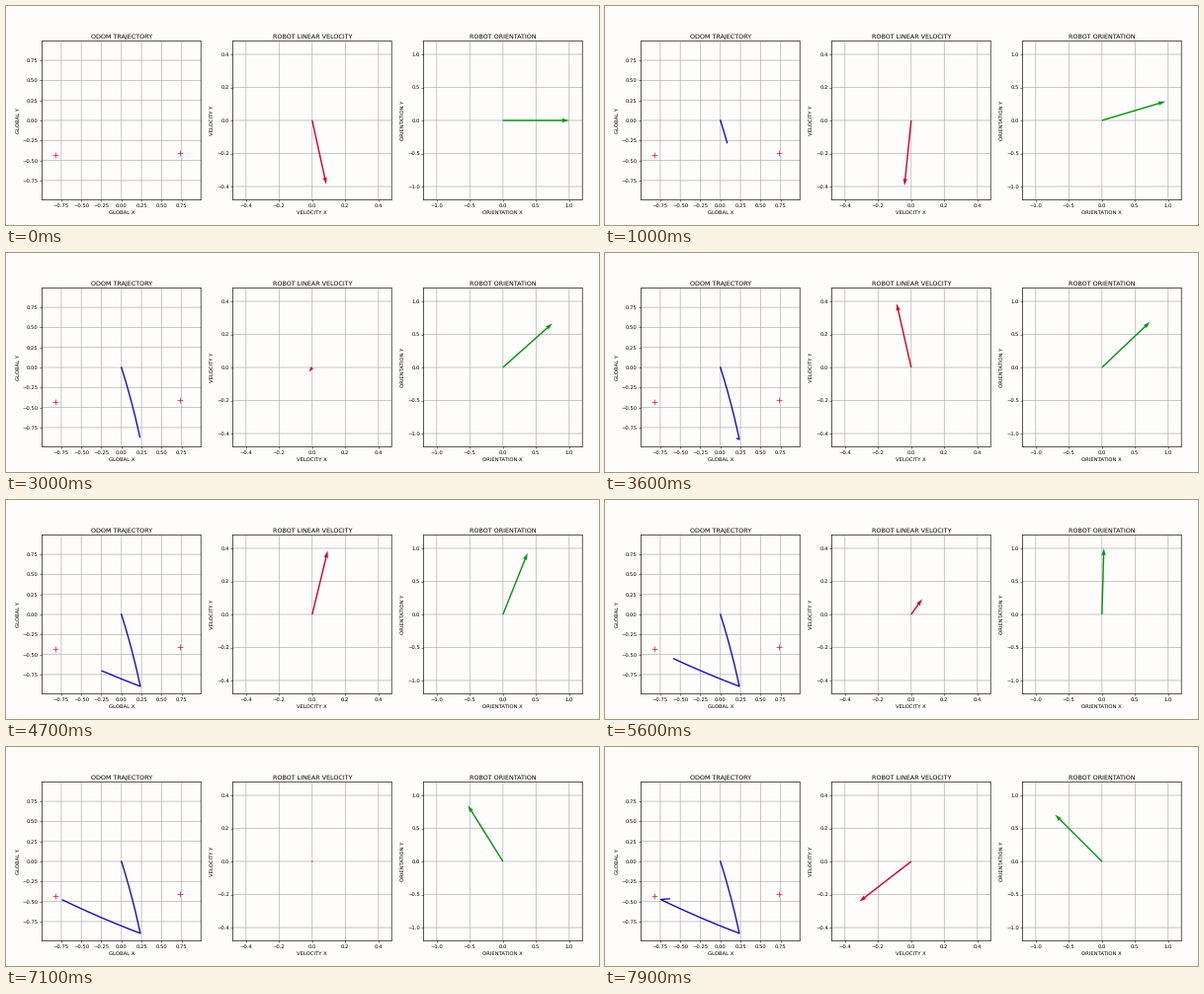
A matplotlib script that plays this animation: 600 px wide and 222 px high, repeating every 8000 ms.

```python
import numpy as np
import matplotlib.pyplot as plt
from matplotlib.animation import FuncAnimation

W, H, DPI = 600, 222, 37.5
FRAMES, INTERVAL = 80, 100
LEFT, BOTTOM, SIDE, PITCH = 36.4, 25.6, 160.8, 193
RED, BLUE, GREEN = "#cf0a2c", "#1808b8", "#0a9418"

CRUISE = 0.44            # ground speed
TOP_SPEED = 0.396        # longest commanded velocity
BRAKE, DECAY = 0.24, 1.4  # braking distance and rate
STOP = 0.03
BULGE = 0.012            # sideways bow of each leg
DRIFT = -1.6             # course drift, degrees per second

plt.rcParams.update({
    "font.family": "DejaVu Sans",
    "font.size": 10.1,
    "text.hinting": "none",
    "axes.titlesize": 12.2,
    "axes.linewidth": 1.25,
    "xtick.major.width": 1,
    "ytick.major.width": 1,
    "grid.linewidth": 1.3,
    "grid.color": "#b0b0b0",
    "axes.axisbelow": True,
})


class Leg:
    """Straight run to a goal: cruise, then ease out exponentially."""

    def __init__(self, start, goal, order, depart, course):
        self.start = np.array(start)
        self.span = np.array(goal) - self.start
        self.length = np.hypot(*self.span)
        self.normal = np.array([-self.span[1], self.span[0]]) / self.length
        self.order, self.depart, self.course = order, depart, course

    def remaining(self, t):
        left = self.length - CRUISE * max(t - self.depart, 0)
        if left > BRAKE:
            return left
        return BRAKE * np.exp(-DECAY * (BRAKE - left) / CRUISE)

    def position(self, t):
        u = 1 - self.remaining(t) / self.length
        bow = 4 * BULGE * u * (1 - u)
        return self.start + self.span * u + self.normal * bow

    def command(self, t):
        left = self.remaining(t)
        speed = TOP_SPEED if left > BRAKE else 0.6 * left * (left > STOP)
        return speed, self.course + DRIFT * (t - self.order)


def add_leg(goal, order, depart, course):
    start = legs[-1].position(depart) if legs else (0.0, 0.0)
    legs.append(Leg(start, goal, order, depart, course))


def heading(t):
    return np.interp(t, [0.25, 2, 3.6, 7.1, 7.9], [0, 38.9, 43.5, 122, 135])


def latest(t, key):
    return [leg for leg in legs if key(leg) <= t or leg is legs[0]][-1]


def polar(r, deg):
    a = np.radians(deg)
    return r * np.cos(a), r * np.sin(a)


def panel(col, lim, ticks, title, name):
    ax = fig.add_axes([(LEFT + col * PITCH) / W, BOTTOM / H,
                       SIDE / W, SIDE / H])
    ax.set(xlim=(-lim, lim), ylim=(-lim, lim), xticks=ticks, yticks=ticks,
           title=title, xlabel=name + " X", ylabel=name + " Y")
    ax.set_facecolor("none")
    ax.grid(True)
    for line in [*ax.get_xgridlines(), *ax.get_ygridlines(),
                 *ax.spines.values()]:
        line.set_snap(False)
    return ax


def arrow(ax, color):
    return ax.quiver([0], [0], [1], [0], color=color, angles="xy",
                     scale_units="xy", scale=1, width=0.009, zorder=3)


# Each leg: goal, time ordered, time moving, commanded course
legs = []
add_leg((0.241, -0.924), 0, 0.34, -77.6)
add_leg((-0.755, -0.47), 3.15, 3.53, 147)
add_leg((0.73, -0.405), 7.15, 7.65, -6)

fig = plt.figure(figsize=(W / DPI, H / DPI), dpi=DPI, facecolor="#fefdfb")
odom = panel(0, 0.99, np.arange(-3, 4) * 0.25, "ODOM TRAJECTORY", "GLOBAL")
vel = panel(1, 0.48, np.arange(-2, 3) * 0.2,
            "ROBOT LINEAR VELOCITY", "VELOCITY")
ori = panel(2, 1.2, np.arange(-2, 3) * 0.5,
            "ROBOT ORIENTATION", "ORIENTATION")

odom.scatter([-0.818, 0.73], [-0.437, -0.405], marker="+", s=121,
             color="#d02850", linewidths=1.5, snap=False)
trail, = odom.plot([], [], color=BLUE, lw=2.6)
vel_arrow = arrow(vel, RED)
ori_arrow = arrow(ori, GREEN)

times = np.arange(0, 8, 0.01)
track = np.array([latest(t, lambda leg: leg.depart).position(t)
                  for t in times])


def draw(i):
    t = i * INTERVAL / 1000
    seen = track[times <= t + 1e-6] if i else track[:0]
    trail.set_data(seen[:, 0], seen[:, 1])
    # Velocity is shown in the robot's own frame
    speed, course = latest(t, lambda leg: leg.order).command(t)
    vel_arrow.set_UVC(*polar(speed, course - heading(t)))
    ori_arrow.set_UVC(*polar(1, heading(t)))
    return trail, vel_arrow, ori_arrow


anim = FuncAnimation(fig, draw, frames=FRAMES, interval=INTERVAL,
                     repeat=True, repeat_delay=0)
plt.show()
```
